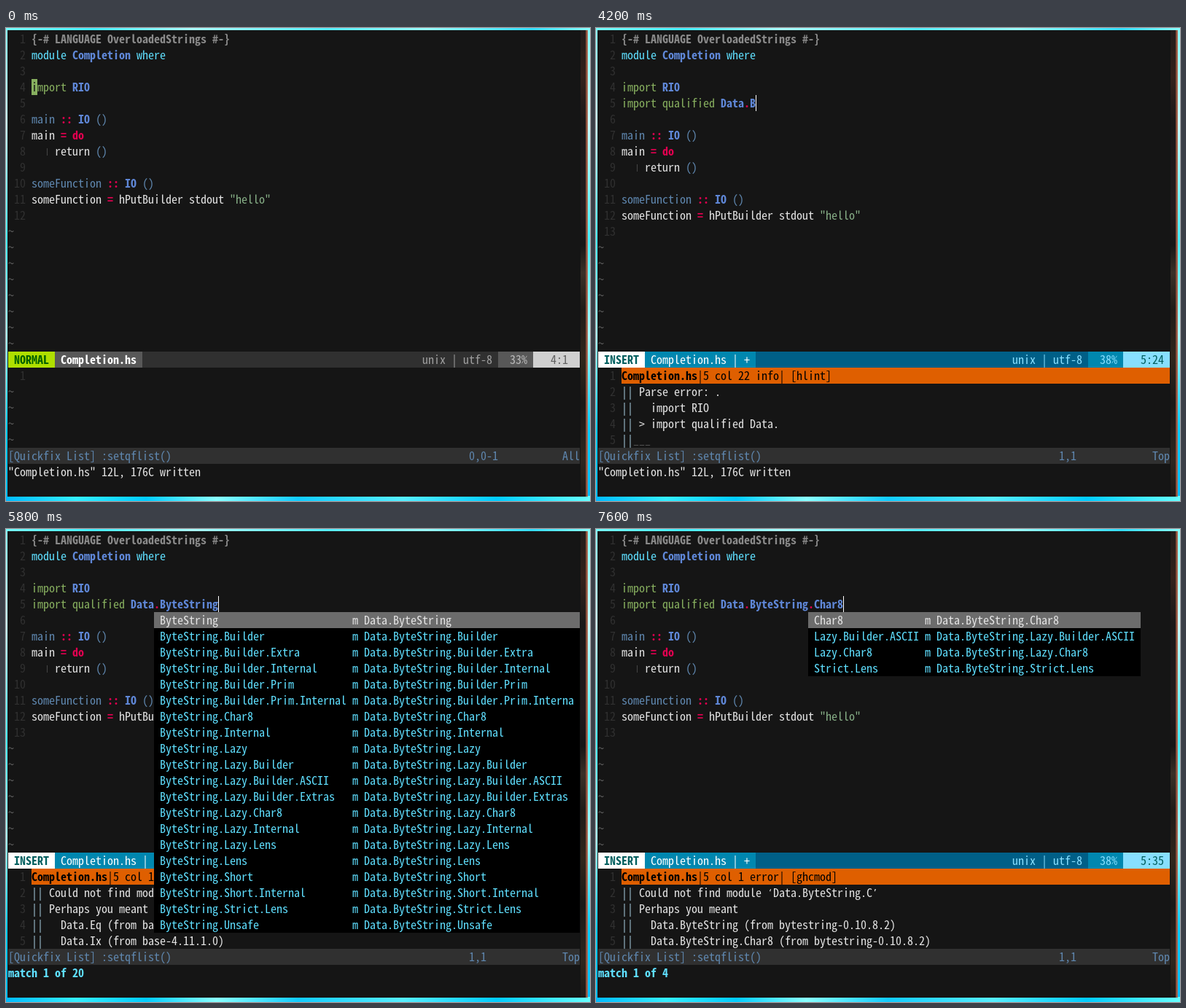
An HTML page for the animation above (8 s loop, 801 by 649 pixels).

```html
<!DOCTYPE html>
<html lang="en">
<head>
<meta charset="utf-8">
<title>Haskell module completion</title>
<style>
  html, body { margin: 0; width: 100%; height: 100%; overflow: hidden; }
  body {
    background:
      linear-gradient(90deg, #7ff 0, #4ef 15%, #aff 32%, #5ef 55%, #9ff 72%, #3df 90%, #8ff) 0 0 / 100% 3px no-repeat,
      linear-gradient(90deg, #0bf 0, #3ef 12%, #0cf 24%, #8ff 36%, #1cf 50%, #5ef 68%, #0cf 84%, #6ff) 0 642px / 100% 7px no-repeat,
      linear-gradient(#8ff, #cff 20%, #4ef 45%, #aff 65%, #0cf 85%, #0bf);
  }
  #side, #edge { position: absolute; top: 3px; height: 640px; }
  #side {
    left: 787px; width: 8px;
    background: linear-gradient(#211d1c, #33211c 10%, #191818 20%, #201a1e 38%, #161616 46%, #3a3028 52%, #1f1c18 60%, #30261c 70%, #1a1917 80%, #2e261f 92%, #1c1a18);
  }
  #edge { left: 795px; width: 3px; background: linear-gradient(90deg, #70402f, #b5705a); }
  #term { position: absolute; left: 3px; top: 4px; width: 784px; height: 638px; background: #151515; box-shadow: 0 0 0 1px #151515; }
  #screen { position: absolute; inset: 0; overflow: hidden; font-family: "Noto Sans Mono CJK JP", "Noto Sans Mono", monospace; font-size: 16px; font-variant-ligatures: none; }
  #screen * { position: absolute; white-space: pre; line-height: 20px; }
  .quote { font-family: "Noto Sans Mono", monospace; font-size: 13.33px; }
  .bold, .type, .key, .pragma { font-weight: bold; }
  .text { color: #e4e4e4; }
  .num { color: #303030; }
  .tilde { color: #626262; }
  .pragma { color: #8a8a8a; }
  .cyan { color: #5fdfff; }
  .type { color: #5f87d7; }
  .green { color: #87af5f; }
  .sig { color: #5f87af; }
  .key { color: #e0004f; }
  .str { color: #87af87; }
  .bar { color: #a8cfe0; }
  .dim { color: #555; }
  .dark { color: #000; }
</style>
</head>
<body>
<div id="side"></div><div id="edge"></div>
<div id="term"><div id="screen"></div></div>
<script>
const CW = 8, RH = 22, COLS = 98, LOOP = 8000;
const screen = document.getElementById('screen');
let html = '';

// Pick the font size whose advance equals one cell.
const probe = document.createElement('canvas').getContext('2d');
probe.font = '100px ' + getComputedStyle(screen).fontFamily;
screen.style.fontSize = CW * 100 / probe.measureText('M').width + 'px';

function box(x, y, w, h, color) {
  html += `<div style="left:${x}px;top:${y}px;width:${w}px;height:${h}px;background:${color}"></div>`;
}
const fill = (row, col, cols, color, rows = 1) => box(col * CW, row * RH, cols * CW, rows * RH, color);

function put(row, col, text, cls = 'text', color = '') {
  for (const part of text.split(/([‘’])/)) {
    const quote = /[‘’]/.test(part) ? ' quote' : '';
    if (part) html += `<span class="${cls}${quote}" style="left:${col * CW}px;top:${row * RH}px;${color && 'color:' + color}">${part}</span>`;
    col += part.length;
  }
}

// Runs are [text, class] pairs laid end to end.
function putRuns(row, col, runs) {
  for (const [text, cls] of runs) {
    put(row, col, text, cls);
    col += text.length;
  }
}
const number = (row, n) => put(row, n > 9 ? 1 : 2, String(n), 'num');

const signature = name => [[name, 'sig'], [' :: ', 'key'], ['IO', 'type'], [' ()', 'sig']];
const head = [
  [['{-# LANGUAGE OverloadedStrings #-}', 'pragma']],
  [['module ', 'cyan'], ['Completion', 'type'], [' where', 'cyan']],
  [],
  [['import ', 'green'], ['RIO', 'type']]
];
const tail = [
  [],
  signature('main'),
  [['main ', 'text'], ['= do', 'key']],
  [['    return ', 'text'], ['()', 'sig']],
  [],
  signature('someFunction'),
  [['someFunction ', 'text'], ['=', 'key'], [' hPutBuilder stdout ', 'text'], ['"hello"', 'str']],
  []
];

function importRuns(line) {
  const mod = line.slice(17).split(/(\.)/).map(p => [p, p === '.' ? 'key' : 'type']);
  return [
    [line.slice(0, 7), line.length > 7 ? 'green' : 'text'],
    [line.slice(7, 17), line.length > 15 ? 'green' : 'text'],
    ...mod
  ];
}

function drawCode(s) {
  const lines = s.insert ? [...head, importRuns(s.line), ...tail] : [...head, ...tail];
  lines.forEach((runs, row) => {
    number(row, row + 1);
    putRuns(row, 4, runs);
  });
  for (let row = lines.length; row < 20; row++) put(row, 0, '~', 'tilde');
  box(53, (lines.length - 5) * RH + 7, 1, 10, '#444');
}

function drawStatus(s) {
  const c = s.insert
    ? { mode: '#fff', modeFg: '#005f5f', file: '#0087af', mid: '#005f87', fg: '#87dfff', pos: '#87dfff', posFg: '#005f5f' }
    : { mode: '#afdf00', modeFg: '#005f00', file: '#585858', mid: '#303030', fg: '#9e9e9e', pos: '#d0d0d0', posFg: '#606060' };
  fill(20, 0, 8, c.mode);
  fill(20, 8, 76, c.mid);
  fill(20, 8, s.insert ? 19 : 15, c.file);
  fill(20, 84, 6, c.file);
  fill(20, 90, 8, c.pos);
  put(20, 1, s.insert ? 'INSERT' : 'NORMAL', 'bold', c.modeFg);
  put(20, 9, s.insert ? 'Completion.hs | +' : 'Completion.hs', s.insert ? '' : 'bold', '#fff');
  put(20, 71, 'unix | utf-8', '', c.fg);
  put(20, 86, s.insert ? '38%' : '33%', '', s.insert ? c.fg : '#bcbcbc');
  put(20, 93, s.pos || (s.insert ? '5:' + (s.line.length + 1) : '4:1'), '', c.posFg);
}

function drawQuickfix(list) {
  number(21, 1);
  if (list) {
    fill(21, 4, 94, '#df5f00');
    putRuns(21, 4, [['Completion.hs', 'dark bold'], [list[0], 'dark']]);
  }
  for (let i = 1; i < 5; i++) {
    if (!list) { put(21 + i, 0, '~', 'tilde'); continue; }
    number(21 + i, i + 1);
    putRuns(21 + i, 4, [['||', 'bar'], [list[i], list[i] === '___' ? 'dim' : 'text']]);
  }
  fill(26, 0, COLS, '#303030');
  put(26, 0, '[Quickfix List] :setqflist()', 'sig');
  put(26, 79, list ? '1,1' : '0,0-1', 'sig');
  put(26, 95, list ? 'Top' : 'All', 'sig');
}

function drawPopup({ col, names, prefix, tag = '', kind, thumb = 0, selected }) {
  const longest = Math.max(...names.map(n => n.length));
  const kindCol = kind || col + longest + 2;
  const menuCol = kindCol + 2 + tag.length;
  const end = Math.min(COLS, menuCol + prefix.length + longest + 1);
  const room = end - 1 - menuCol;
  fill(5, col, end - col, '#000', names.length);
  if (selected) fill(5, col, end - col, '#6c6c6c');
  names.forEach((name, i) => {
    const cls = selected && !i ? 'text' : 'cyan';
    put(5 + i, col + 1, name, cls);
    put(5 + i, kindCol, 'm ' + tag + (prefix + name).slice(0, room), cls);
  });
  if (thumb) fill(5, end - 1, 1, '#fff', thumb);
}

function drawMessage(message, insert) {
  if (message === BACK) {
    fill(27, 0, message.length, '#444');
    put(27, 0, message, 'bold', '#fff');
  } else {
    put(27, 0, message, message.startsWith('match') ? 'bold cyan' : 'text');
  }
}

function draw(s) {
  html = '';
  drawCode(s);
  drawStatus(s);
  drawQuickfix(s.list);
  drawMessage(s.message);
  if (s.popup) drawPopup(s.popup);
  if (!s.insert) {
    fill(3, 4, 1, '#87af5f');
    put(3, 4, 'i', '', '#151515');
  } else if (s.cursorBelow) {
    box(s.message.length * CW, 27 * RH, 1, RH, '#fff');
  } else {
    box((4 + s.line.length) * CW, 4 * RH, 1, RH, '#fff');
  }
  screen.innerHTML = html;
}

const BACK = 'Back at original';
const words = s => s.split(' ');
const family = (root, parts) => [root, ...words(parts).map(p => root + '.' + p)];
const aeson = family('Aeson', 'Encode Encoding Encoding.Internal Internal Internal.Time Parser Parser.Internal TH Text Types');
const short = words('Bifoldable Bifunctor Bitraversable Bits Bits.Lens Bool');
const bytes = family('ByteString', 'Builder Builder.Extra Builder.Internal Builder.Prim Builder.Prim.Internal Char8 Internal Lazy Lazy.Builder Lazy.Builder.ASCII Lazy.Builder.Extras Lazy.Char8 Lazy.Internal Lazy.Lens Lens Short Short.Internal Strict.Lens Unsafe');

const dataPopup = { col: 25, prefix: 'Data.' };
const allModules = { ...dataPopup, names: [...aeson, 'Array.Lens', ...short, ...bytes].slice(0, 22), tag: '[nhl] ', kind: 68, thumb: 2 };
const bModules = { ...dataPopup, names: [...short, ...bytes].slice(0, 22), kind: 68, thumb: 6 };
const byModules = { ...dataPopup, names: bytes };
const charModules = { col: 36, prefix: 'Data.ByteString.', names: words('Char8 Lazy.Builder.ASCII Lazy.Char8 Strict.Lens') };

const hlint = ['|5 col 22 info| [hlint]', ' Parse error: .', '   import RIO', ' > import qualified Data.', '___'];
const ghcmod = (name, a, b) => ['|5 col 1 error| [ghcmod]', ` Could not find module ‘${name}’`, ' Perhaps you meant', '   ' + a, '   ' + b];
const missingB = ghcmod('Data.B', 'Data.Eq (from base-4.11.1.0)', 'Data.Ix (from base-4.11.1.0)');
const missingC = ghcmod('Data.ByteString.C', 'Data.ByteString (from bytestring-0.10.8.2)', 'Data.ByteString.Char8 (from bytestring-0.10.8.2)');

// Keystroke times; the pause after "qualifie" is followed by two characters at once.
const typed = 'import qualified Data.B';
const strokes = [200, 400, 600, 700, 800, 900, 1100, 1200, 1400, 1500, 1600, 1800, 1900, 2200, 2300, 2400, 3000, 3100, 3300, 3600, 3700, 3900, 4200];
const base = 'import qualified Data.';
const steps = [
  [0, { insert: false, line: '', list: null, popup: null, message: '"Completion.hs" 12L, 176C written' }],
  ...strokes.map((t, i) => [t, { insert: true, line: typed.slice(0, i < 16 ? i : i + 1) }]),
  [4200, { list: hlint }],
  [4500, { popup: allModules, message: 'match 1 of 236', cursorBelow: true }],
  [4600, { message: BACK, cursorBelow: false }],
  [4700, { popup: bModules }],
  [5200, { list: missingB }],
  [5400, { line: base + 'By', popup: byModules }],
  [5800, { line: base + 'ByteString', popup: { ...byModules, selected: true }, message: 'match 1 of 20' }],
  [6100, { line: base + 'ByteString.', popup: null, message: '' }],
  [6400, { line: base + 'ByteString.C' }],
  [7200, { popup: charModules, list: missingC, message: BACK }],
  [7600, { line: base + 'ByteString.Char8', pos: '5:35', popup: { ...charModules, selected: true }, message: 'match 1 of 4' }]
];

let shown = -1;
function tick() {
  const t = performance.now() % LOOP;
  const count = steps.filter(([at]) => at <= t).length;
  if (count !== shown) {
    shown = count;
    draw(Object.assign({}, ...steps.slice(0, count).map(([, patch]) => patch)));
  }
  requestAnimationFrame(tick);
}
tick();
</script>
</body>
</html>
```
